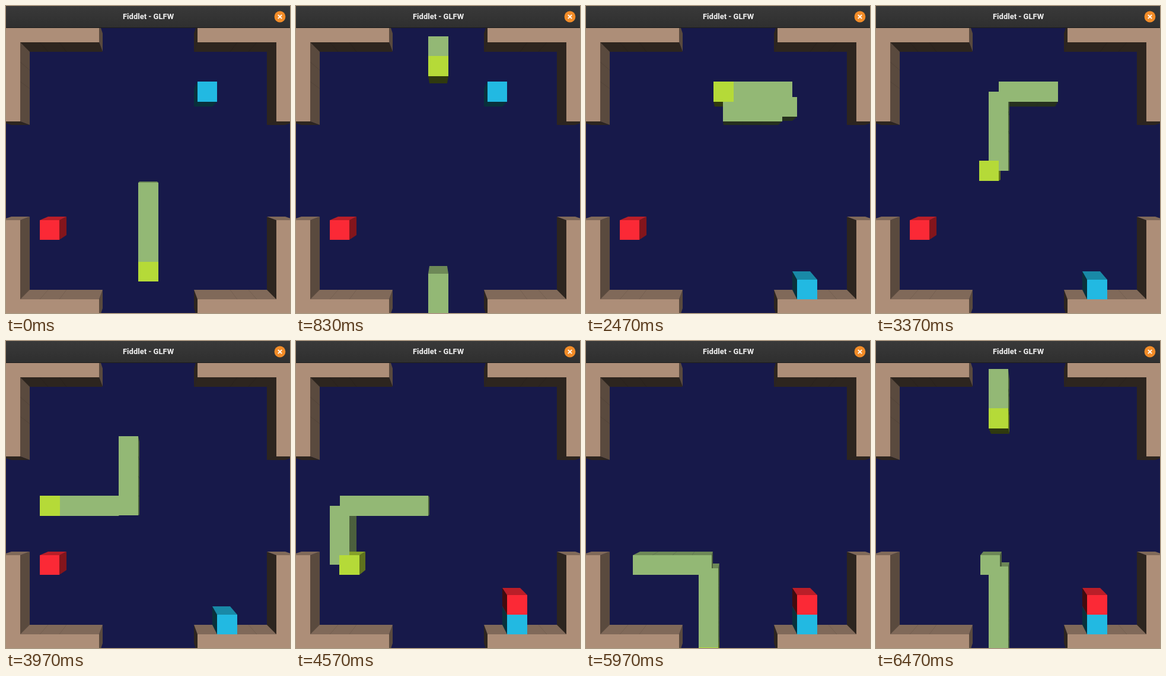
Animation of 479 by 516 pixels, one loop 6510 ms. Source, as an HTML page with a canvas:

```html
<!DOCTYPE html>
<html lang="en">
<head>
<meta charset="utf-8">
<title>Fiddlet - GLFW</title>
<style>
html, body { margin: 0; width: 479px; height: 516px; overflow: hidden; background: #17194a; }
canvas { position: absolute; left: 0; top: 0; display: block; }
.bar {
  position: absolute; left: 0; top: 0; width: 479px; height: 37px;
  box-sizing: border-box; border-bottom: 1px solid #1c1c1c;
  background: linear-gradient(#393939, #2f2f2f);
  color: #f4f4f4; font: 700 13px/36px Roboto, "Open Sans", sans-serif; text-align: center;
}
.bar span { position: relative; left: .5px; }
.bar svg { position: absolute; left: 452px; top: 8px; }
</style>
</head>
<body>
<canvas id="stage" width="479" height="516"></canvas>
<div class="bar"><span>Fiddlet - GLFW</span>
  <svg width="20" height="20" viewBox="0 0 20 20">
    <circle cx="10" cy="10" r="9.4" fill="#f28c28"/>
    <path d="M6.8 6.8l6.4 6.4M13.2 6.8l-6.4 6.4" stroke="#fff" stroke-width="1.9"/>
  </svg>
</div>
<script>
const ctx = document.getElementById('stage').getContext('2d');
const LOOP = 6510, FRAME = 100 / 3, STEP = 171.4;
const CX = 240, CY = 277, CELL = 33.25, FLOOR = 0.9254;
const WALL = [173, 142, 120], BODY = [147, 184, 117], HEAD = [181, 218, 56];
const CYAN = [34, 185, 226], RED = [251, 41, 54];
const LIGHT = { up: 0.74, right: 0.52, left: 0.26, down: 0.26 };
const DIRS = { U: [0, -1], D: [0, 1], L: [-1, 0], R: [1, 0] };

const shade = (c, k) => `rgb(${c.map(v => Math.round(v * k)).join()})`;
const px = (x, k = 1) => Math.round(CX + x * CELL * k);
const py = (y, k = 1) => Math.round(CY + y * CELL * k);
const wrap = v => v > 7 ? v - 15 : v < -7 ? v + 15 : v;

// Cells the head visits, starting at the first tail cell (step -4)
const FIRST = -4;
const path = [];
let cx = 0, cy = 1;
for (const [, d, n] of 'D11 R3 U1 L4 D4 L4 D3 R4 D13'.matchAll(/([UDLR])(\d+)/g)) {
  for (let i = 0; i < +n; i++) {
    const [dx, dy] = DIRS[d];
    path.push({ x: cx, y: cy, dx, dy });
    cx = wrap(cx + dx);
    cy = wrap(cy + dy);
  }
}

function along(s) {
  const i = Math.floor(s), f = s - i, c = path[i - FIRST];
  return { x: c.x + c.dx * f, y: c.y + c.dy * f };
}

// The tail waits while the snake grows
function tailAt(s) {
  if (s < 11) return s - 4;
  return s < 26 ? Math.max(7, s - 7) : Math.max(19, s - 8);
}

function stepsAt(t) {
  return t < 700 ? 0.1 + t / STEP : Math.max(0.1 + 700 / STEP, 4.69 + (t - 830) / STEP);
}

function side(ax, ay, bx, by, color, light) {
  ctx.fillStyle = shade(color, light);
  ctx.beginPath();
  ctx.moveTo(px(ax), py(ay));
  ctx.lineTo(px(bx), py(by));
  ctx.lineTo(px(bx, FLOOR), py(by, FLOOR));
  ctx.lineTo(px(ax, FLOOR), py(ay, FLOOR));
  ctx.fill();
}

function sides({ x0, y0, x1, y1, color }) {
  if (x0 > 0) side(x0, y0, x0, y1, color, LIGHT.left);
  if (x1 < 0) side(x1, y0, x1, y1, color, LIGHT.right);
  if (y0 > 0) side(x0, y0, x1, y0, color, LIGHT.up);
  if (y1 < 0) side(x0, y1, x1, y1, color, LIGHT.down);
}

function lid({ x0, y0, x1, y1, color }) {
  ctx.fillStyle = shade(color, 1);
  ctx.fillRect(px(x0), py(y0), px(x1) - px(x0), py(y1) - py(y0));
}

const cube = (x, y, color) => ({
  x0: x - 0.5, y0: y - 0.5, x1: x + 0.5, y1: y + 0.5, color, far: Math.hypot(x, y)
});

function seam(x, y) {
  ctx.beginPath();
  ctx.moveTo(px(x), py(y));
  ctx.lineTo(px(x, FLOOR), py(y, FLOOR));
  ctx.stroke();
}

function walls() {
  const spans = [[-7.5, -2.5], [2.5, 7.5]], ends = [[-7.5, -6.5], [6.5, 7.5]];
  const boxes = [];
  for (const [y0, y1] of ends)
    for (const [x0, x1] of spans) boxes.push({ x0, y0, x1, y1, color: WALL });
  for (const [x0, x1] of ends)
    for (const [y0, y1] of [[-6.5, -2.5], [2.5, 6.5]]) boxes.push({ x0, y0, x1, y1, color: WALL });
  boxes.forEach(sides);
  boxes.forEach(lid);
  ctx.strokeStyle = 'rgba(0,0,0,.13)';
  ctx.lineWidth = 0.7;
  for (const a of [4.5, 5.5]) {
    for (const sx of [-1, 1]) {
      seam(sx * a, -6.5);
      seam(sx * a, 6.5);
    }
    seam(-6.5, -a);
  }
}

function draw(t) {
  const s = stepsAt(t), tail = tailAt(s), cubes = [];
  ctx.fillStyle = '#17194a';
  ctx.fillRect(0, 0, 479, 516);
  walls();

  cubes.push(s < 11 ? cube(3, -4, CYAN) : cube(4, 6, CYAN));
  cubes.push(s < 26 ? cube(-5, 3, RED) : cube(4, 5, RED));
  const add = (p, color) => {
    const c = along(p);
    cubes.push(cube(c.x, c.y, color));
  };
  add(tail, BODY);
  for (let p = s - 1; p > tail + 1e-6; p--) add(p, BODY);
  add(s, HEAD);

  [...cubes].sort((a, b) => b.far - a.far).forEach(sides);
  cubes.forEach(lid);
}

const start = performance.now();
function tick() {
  const t = (performance.now() - start) % LOOP;
  draw(Math.floor((t + 3.4) / FRAME) * FRAME);
  requestAnimationFrame(tick);
}
tick();
</script>
</body>
</html>
```
